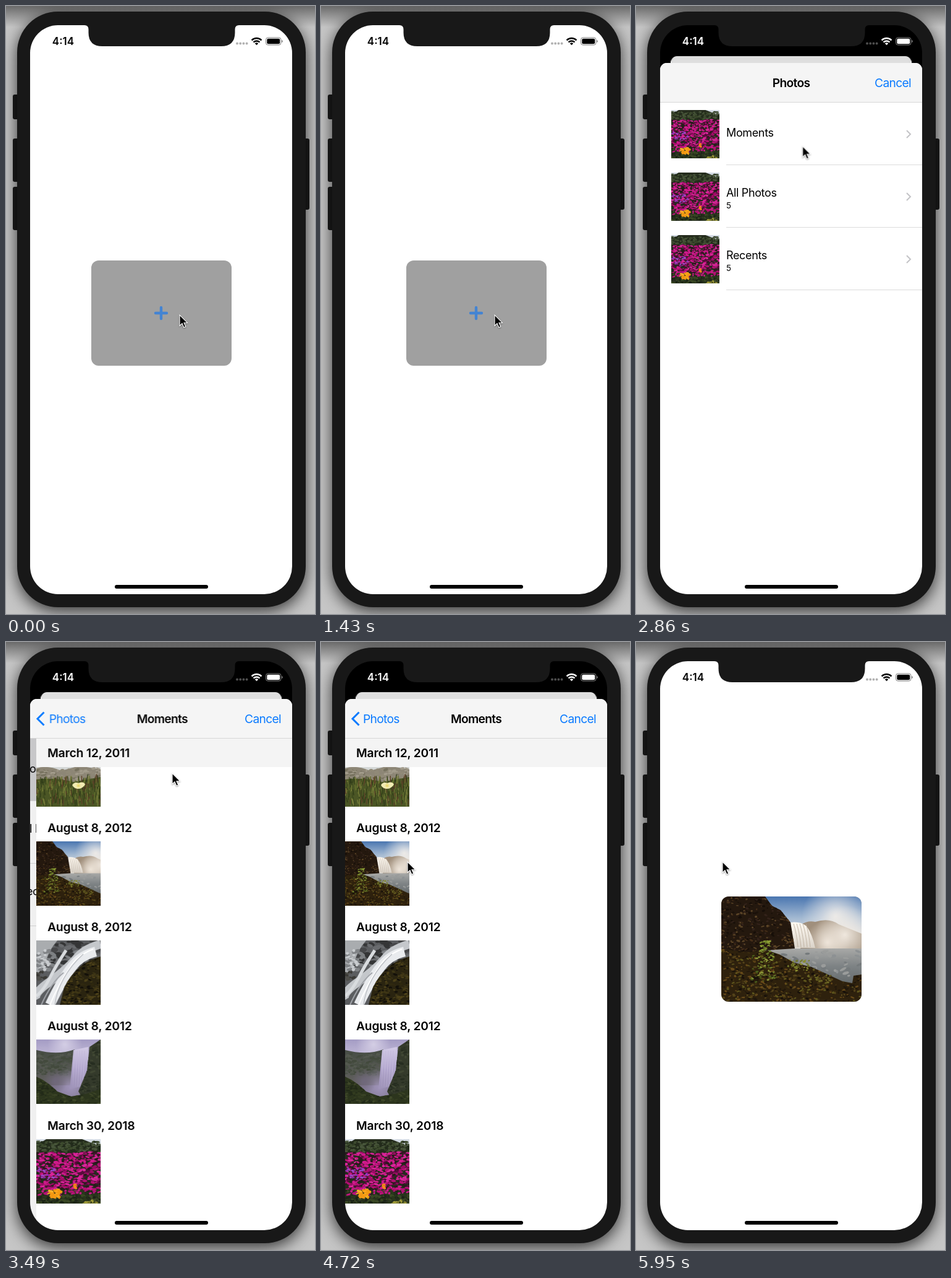
An HTML page with a canvas for the animation above (5980 ms loop, 500 by 982 pixels).

```html
<!DOCTYPE html>
<html lang="en">
<head>
<meta charset="utf-8">
<title>Photo picker</title>
<style>
:root { --loop: 5980ms; --ios: cubic-bezier(.32,.72,0,1); --blue: #0a7aff; }
html, body { margin: 0; width: 100%; height: 100%; overflow: hidden; }
#stage {
  position: relative; width: 500px; height: 982px; overflow: hidden;
  background: linear-gradient(#0007, #0000 34px), #c6c6c6;
  font: 400 19.2px/24px Inter, "Liberation Sans", sans-serif; color: #000;
}
#stage div, #stage svg, #stage canvas { position: absolute; }
svg { overflow: visible; }

/* device */
.body { left: 18px; top: 9px; width: 467px; height: 962px; border-radius: 66px; background: #181818; box-shadow: 0 7px 26px #000b; }
.key { width: 12px; border-radius: 3px; background: #1c1c1c; }
.screen { left: 39px; top: 31px; width: 424px; height: 919px; border-radius: 45px; overflow: hidden; background: #000; }
.notch { left: 0; top: 0; }
.status { left: 0; top: 0; animation: status var(--loop) infinite; }
.status text { font-size: 17px; font-weight: 600; }
.bar { left: 137px; top: 904px; width: 151px; height: 6px; border-radius: 3px; background: #000; }

/* first view */
.home { inset: 0; background: #fff; border-radius: 11px; overflow: hidden; transform-origin: 50% 0; animation: recede var(--loop) var(--ios) infinite; }
.shade { inset: 0; background: #000; opacity: 0; animation: shade var(--loop) var(--ios) infinite; }
.card { left: 99px; top: 380px; width: 227px; height: 170px; border-radius: 12px; overflow: hidden; background: #a0a0a0; }
.card svg { left: 102px; top: 74px; }
.card canvas { animation: chosen var(--loop) step-end infinite; }

/* sheet */
.sheet { left: 0; top: 61px; width: 424px; height: 858px; border-radius: 11px 11px 0 0; overflow: hidden; background: #fff; animation: sheet var(--loop) var(--ios) infinite; }
.nav { left: 0; top: 0; width: 424px; height: 63px; background: #f5f5f5; border-bottom: 1px solid #d6d6d6; letter-spacing: -.035em; }
.nav div { top: 20px; white-space: nowrap; }
.loaded { animation: loaded var(--loop) step-end infinite; }
.nav .cancel { right: 18px; color: var(--blue); }
.title { left: 0; width: 424px; text-align: center; font-weight: 600; }
.old { animation: oldTitle var(--loop) var(--ios) infinite; }
.new { animation: newTitle var(--loop) var(--ios) infinite; }
.back { left: 29px; color: var(--blue); animation: back var(--loop) var(--ios) infinite; }
.nav .arrow { left: 10px; top: 20px; animation: arrow var(--loop) var(--ios) infinite; }
.page { left: 0; top: 64px; width: 424px; height: 794px; background: #fff; }
.list { animation: parallax var(--loop) var(--ios) infinite; }
.veil { inset: 0; background: #000; opacity: 0; animation: veil var(--loop) var(--ios) infinite; }
.moments { animation: push var(--loop) var(--ios) infinite; }
.row { left: 0; width: 424px; height: 101px; font-size: 18px; letter-spacing: -.02em; }
.row::after { content: ""; position: absolute; left: 107px; right: 0; bottom: 0; height: 1px; background: #dcdcdc; }
.row canvas { left: 18px; top: 12px; }
.row div { left: 107px; white-space: nowrap; }
.row .count { top: 53px; font-size: 13.5px; }
.row svg { left: 398px; top: 44px; }
.tap { animation: tap var(--loop) step-end infinite; }
.date { left: 0; width: 406px; height: 46px; padding-left: 18px; line-height: 46px; font-weight: 600; letter-spacing: -.008em; }
.stuck { background: #f4f4f4; }
.cursor { left: 0; top: 0; filter: drop-shadow(0 1px 1px #0006); animation: cursor var(--loop) infinite; }

@keyframes sheet {
  0%, 26.756% { transform: translateY(858px); }
  35.117%, 81.02% { transform: none; }
  89.381%, 100% { transform: translateY(858px); }
}
@keyframes recede {
  0%, 26.756% { transform: none; }
  35.117%, 81.02% { transform: translateY(50px) scale(.9175); }
  89.381%, 100% { transform: none; }
}
@keyframes shade {
  0%, 26.756% { opacity: 0; }
  35.117%, 81.02% { opacity: .13; }
  89.381%, 100% { opacity: 0; }
}
@keyframes status {
  0%, 26.756% { color: #000; }
  30%, 81.02% { color: #fff; }
  84.5%, 100% { color: #000; }
}
@keyframes loaded { 0% { opacity: 0; } 37.6%, 100% { opacity: 1; } }
@keyframes chosen { 0% { opacity: 0; } 79.5%, 100% { opacity: 1; } }
@keyframes tap { 0% { background: #fff; } 51.8%, 100% { background: #d3d3d6; } }
@keyframes push {
  0%, 53.344% { transform: translateX(424px); }
  61.706%, 100% { transform: none; }
}
@keyframes parallax {
  0%, 53.344% { transform: none; }
  61.706%, 100% { transform: translateX(-127px); }
}
@keyframes veil {
  0%, 53.344% { opacity: 0; }
  61.706%, 100% { opacity: .06; }
}
@keyframes oldTitle {
  0%, 53.344% { transform: none; opacity: 1; }
  61.706%, 100% { transform: translateX(-153px); opacity: 0; }
}
@keyframes newTitle {
  0%, 53.344% { transform: translateX(72px); opacity: 0; }
  61.706%, 100% { transform: none; opacity: 1; }
}
@keyframes back {
  0%, 53.344% { transform: translateX(72px); opacity: 0; }
  61.706%, 100% { transform: none; opacity: 1; }
}
@keyframes arrow {
  0%, 53.344% { opacity: 0; }
  61.706%, 100% { opacity: 1; }
}
@keyframes cursor {
  0%, 40.1% { transform: translate(281px, 499px); animation-timing-function: ease-in-out; }
  49.3%, 61.9% { transform: translate(269px, 212px); animation-timing-function: ease-in; }
  70.9% { transform: translate(158px, 341px); animation-timing-function: ease-out; }
  74%, 100% { transform: translate(140px, 355px); }
}
</style>
</head>
<body>
<div id="stage">
  <div class="key" style="left:10.5px;top:143px;height:40px"></div>
  <div class="key" style="left:10.5px;top:214px;height:70px"></div>
  <div class="key" style="left:10.5px;top:292px;height:70px"></div>
  <div class="key" style="left:479px;top:214px;height:115px"></div>
  <div class="body"></div>

  <div class="screen">
    <div class="home">
      <div class="card">
        <svg width="22" height="22"><path d="M11 2V20M2 11H20" stroke="#4484d2" stroke-width="4.4" stroke-linecap="round"/></svg>
        <canvas data-pic="cliff" width="227" height="170"></canvas>
      </div>
      <div class="shade"></div>
    </div>

    <div class="sheet">
      <div class="page list">
        <div class="loaded" id="albums" style="inset:0"></div>
        <div class="veil"></div>
      </div>
      <div class="page moments" id="moments"></div>
      <div class="nav">
        <div class="loaded" style="left:0;top:0;width:424px;height:63px">
          <div class="title old">Photos</div>
          <div class="cancel">Cancel</div>
        </div>
        <svg class="arrow" width="14" height="24"><path d="M12.5 1.5L2 12l10.5 10.5" fill="none" stroke="#0a7aff" stroke-width="3"/></svg>
        <div class="back">Photos</div>
        <div class="title new">Moments</div>
      </div>
    </div>
    <div class="bar"></div>
  </div>

  <svg class="status" width="500" height="80" fill="currentColor">
    <text x="92.5" y="63" text-anchor="middle">4:14</text>
    <path d="M374 60.5h16" stroke="currentColor" stroke-width="4" stroke-linecap="round" stroke-dasharray="0 5.2" opacity=".3"/>
    <path d="M397.6 55.4a11 11 0 0 1 15.8 0M400.5 58.5a7 7 0 0 1 10 0" fill="none" stroke="currentColor" stroke-width="2.5"/>
    <path d="M405.5 63.3l-2.7-2.8a4 4 0 0 1 5.4 0z"/>
    <rect x="420.5" y="51" width="24.5" height="12" rx="3.6" fill="none" stroke="currentColor" opacity=".5"/>
    <rect x="422.3" y="52.8" width="20.9" height="8.4" rx="2"/>
    <path d="M446.3 55v4q1.7-.5 1.7-2t-1.7-2z" opacity=".5"/>
  </svg>
  <svg class="notch" width="500" height="80"><path fill="#181818" d="M127 30V31Q133.5 31 133.5 38V43Q133.5 65 156 65H348Q370.5 65 370.5 43V38Q370.5 31 377 31V30Z"/></svg>
  <svg class="cursor" width="14" height="22"><path d="M0 0V17.5L4 13.8L6.8 20.3L9.8 19L7 12.7H12.5Z" stroke="#fff" stroke-width="1.1"/></svg>
</div>

<script>
const albums = [['Moments', ''], ['All Photos', 5], ['Recents', 5]];
document.getElementById('albums').innerHTML = albums.map(([name, count], i) =>
  `<div class="row ${i ? '' : 'tap'}" style="top:${i * 101}px">
    <canvas data-pic="garden" width="78" height="78"></canvas>
    <div style="top:${i ? 33 : 37}px">${name}</div><div class="count">${count}</div>
    <svg width="8" height="13"><path d="M1 1l6 6-6 6" fill="none" stroke="#c4c4c7" stroke-width="2"/></svg>
  </div>`).join('');

const sections = [
  ['March 12, 2011', 'meadow'], ['August 8, 2012', 'cliff'], ['August 8, 2012', 'stream'],
  ['August 8, 2012', 'falls'], ['March 30, 2018', 'garden']
];
// The list is scrolled, with the first date pinned over its photo.
document.getElementById('moments').innerHTML = sections.map(([date, pic], i) => {
  const y = 5.5 + i * 160.3;
  return `<canvas data-pic="${pic}" width="104" height="104" style="left:0;top:${Math.round(y)}px"></canvas>
    <div class="date ${i ? '' : 'stuck'}" style="top:${i ? y - 45 : 0}px">${date}</div>`;
}).join('');

let g, seed;
const rand = () => (seed = (seed * 16807) % 2147483647) / 2147483647;
const shape = (d, fill) => { g.fillStyle = fill; g.fill(new Path2D(d)); };
const strand = (d, width, color) => {
  g.strokeStyle = color;
  g.lineWidth = width;
  g.stroke(new Path2D(d));
};
const fade = (y0, y1, ...colors) => {
  const f = g.createLinearGradient(0, y0, 0, y1);
  colors.forEach((c, i) => f.addColorStop(i / (colors.length - 1), c));
  return f;
};
const glow = (x, y, r, rgb) => {
  const f = g.createRadialGradient(x, y, 0, x, y, r);
  f.addColorStop(0, `rgba(${rgb},.95)`);
  f.addColorStop(1, `rgba(${rgb},0)`);
  g.fillStyle = f;
  g.fillRect(x - r, y - r, 2 * r, 2 * r);
};
const dots = (n, x, y, w, h, r, ...colors) => {
  for (let i = 0; i < n; i++) {
    g.fillStyle = colors[Math.floor(rand() * colors.length)];
    g.beginPath();
    g.ellipse(x + rand() * w, y + rand() * h, r * (.5 + rand()), r * (.3 + rand() * .5), rand() - .5, 0, 7);
    g.fill();
  }
};
const within = (d, paint) => { g.save(); g.clip(new Path2D(d)); paint(); g.restore(); };

const pics = {
  cliff() {
    shape('M0 0H227V170H0Z', fade(0, 70, '#4a76b0', '#a3b9d2', '#efe9e2'));
    glow(185, 32, 55, '238,236,234');
    shape('M128 46Q140 38 152 41Q175 34 190 45L227 60V88H128Z', '#a08f7c');
    glow(200, 62, 48, '243,236,227');
    glow(172, 74, 36, '240,231,220');
    shape('M70 84H227V150H70Z', fade(84, 140, '#a8a9a7', '#7e8385', '#666c6e'));
    dots(60, 80, 88, 147, 40, 4, '#8d9193', '#757a7c', '#9a9c9b');
    shape('M112 42Q128 40 138 48Q147 60 152 83H118Z', fade(42, 84, '#fffaf2', '#d9d2c8'));
    for (let x = 117; x < 140; x += 5) strand(`M${x} 44Q${x + 5} 60 ${x + 7} 82`, .8, '#b9ab9a');
    const wall = 'M0 0H71L82 15L96 22L112 42L119 84L72 87L0 98Z';
    shape(wall, '#24180e');
    within(wall, () => dots(420, 0, 0, 118, 96, 2.2, '#160e08', '#33221a', '#452e18', '#1b120a', '#5b4426'));
    const bank = 'M0 84L40 90L75 87L95 94L118 107L146 114L170 125L196 137L212 140L214 128L227 126V170H0Z';
    shape(bank, '#2e210d');
    within(bank, () => dots(750, 0, 84, 227, 86, 2.3, '#171009', '#3f2f10', '#54431a', '#20170b', '#5e561c', '#684a19'));
    dots(34, 62, 72, 17, 18, 2, '#8f9f36', '#71852b');
    dots(60, 48, 92, 40, 48, 2, '#6d812b', '#4d621c', '#8c9738');
    dots(40, 108, 102, 34, 18, 2, '#74792a', '#8a8d30');
    dots(30, 140, 125, 40, 14, 2, '#6b6624', '#4a3c18');
  },
  meadow() {
    shape('M0 0H104V104H0Z', fade(0, 60, '#c9d3dc', '#d9d9d4'));
    shape('M0 42Q18 36 40 46L70 38L104 44V104H0Z', '#8d8676');
    dots(120, 0, 42, 104, 22, 3, '#a39c8c', '#77725f', '#918a78');
    shape('M0 60Q30 56 60 64L104 56V104H0Z', '#4b5625');
    for (let i = 0; i < 260; i++) {
      const x = rand() * 104, y = 64 + rand() * 40;
      const color = ['#2f3b18', '#65702e', '#7a7f3a', '#3a461c', '#5d3e28'][i % 5];
      strand(`M${x} ${y}l${rand() * 4 - 2} -${6 + rand() * 7}`, 1.3, color);
    }
    shape('M58 69Q62 63 68 66Q76 62 79 68Q74 76 66 75Q60 74 58 69Z', '#f2ecb4');
    glow(68, 70, 4, '232,210,90');
  },
  stream() {
    shape('M0 0H104V104H0Z', '#5b5d60');
    dots(110, 0, 0, 104, 45, 6, '#47484a', '#7d8083', '#696b6e', '#343536');
    shape('M0 0H34Q18 18 14 40L0 56Z', '#a9acaf');
    dots(30, 2, 14, 26, 34, 4, '#c9cccf', '#808386');
    strand('M104 6Q76 14 64 30Q46 50 20 68T0 96', 14, '#c4c7cb');
    strand('M96 18Q72 24 58 42Q42 62 22 104', 16, '#e9ebee');
    strand('M48 16Q32 40 22 60T0 90', 5, '#d9dcdf');
    strand('M92 14Q66 24 54 44Q36 70 22 104', 2, '#ffffff');
    strand('M76 22Q56 40 44 62Q32 84 30 104', 1.5, '#bcbfc4');
    strand('M44 52Q24 68 8 104', 2, '#a2a5aa');
    const bank = 'M104 26Q84 32 74 40Q54 56 45 76L38 104H104Z';
    shape(bank, '#2a2410');
    within(bank, () => dots(300, 38, 26, 66, 78, 2.5, '#131009', '#3d3515', '#2f280f', '#4d4119'));
    dots(16, 0, 50, 14, 14, 3, '#3b3a36', '#504f4b');
  },
  falls() {
    shape('M0 0H104V104H0Z', fade(0, 104, '#a49cc4', '#cbc3de', '#8b829e', '#6b6478'));
    glow(46, 8, 28, '214,208,230');
    shape('M0 17Q35 26 62 16V74H0Z', fade(17, 74, '#474d45', '#62605f'));
    dots(170, 0, 23, 58, 34, 3, '#434a3d', '#54594f', '#4a5146');
    shape('M60 17L84 12L82 74L54 80Z', fade(12, 84, '#d3cbe6', '#b3a7cf', '#a097b8'));
    for (let x = 62; x < 82; x += 4) strand(`M${x} 18L${x - 3} 76`, 1, '#c4bada');
    glow(56, 78, 34, '160,148,186');
    glow(30, 68, 20, '112,104,124');
    const wall = 'M104 0L86 12L82 50L68 84L80 104H104Z';
    shape(wall, '#343a2b');
    within(wall, () => dots(140, 66, 0, 38, 104, 3, '#262d20', '#404733', '#2d3425'));
    const bank = 'M0 60Q18 68 34 84L56 92L80 88L104 80V104H0Z';
    shape(bank, '#2c351d');
    within(bank, () => dots(220, 0, 60, 104, 44, 2.5, '#222a18', '#3f4829', '#333c20'));
  },
  garden() {
    shape('M0 0H104V104H0Z', '#252c1d');
    shape('M0 0H16L8 5H0Z M74 0H104V13L92 7Z', '#d4dbe4');
    dots(260, 0, 4, 104, 17, 2.5, '#3c4a2c', '#222c1b', '#4a573d');
    dots(620, 0, 21, 104, 60, 3, '#b30f73', '#cf1a8b', '#9d0b66', '#d9259a', '#5c0a3d', '#2a1a1c');
    dots(40, 0, 46, 36, 20, 2, '#8d35bd', '#a04acb');
    dots(200, 0, 82, 104, 22, 3, '#29371c', '#3a4824', '#1b2416');
    dots(40, 0, 78, 104, 12, 2.5, '#b30f73', '#c71a88');
    dots(28, 20, 82, 20, 14, 3, '#f59a12', '#ffb52a');
    dots(8, 60, 73, 6, 6, 2.5, '#f08a18');
    dots(16, 76, 99, 26, 6, 2.5, '#a5a03a', '#7d7c30');
  }
};

document.querySelectorAll('canvas').forEach(c => {
  const name = c.dataset.pic;
  g = c.getContext('2d');
  seed = 77;
  if (name === 'cliff') {
    const k = c.height / 170;
    g.setTransform(k, 0, 0, k, (c.width - 227 * k) / 2, 0);
  } else {
    g.scale(c.width / 104, c.height / 104);
  }
  pics[name]();
});
</script>
</body>
</html>
```
